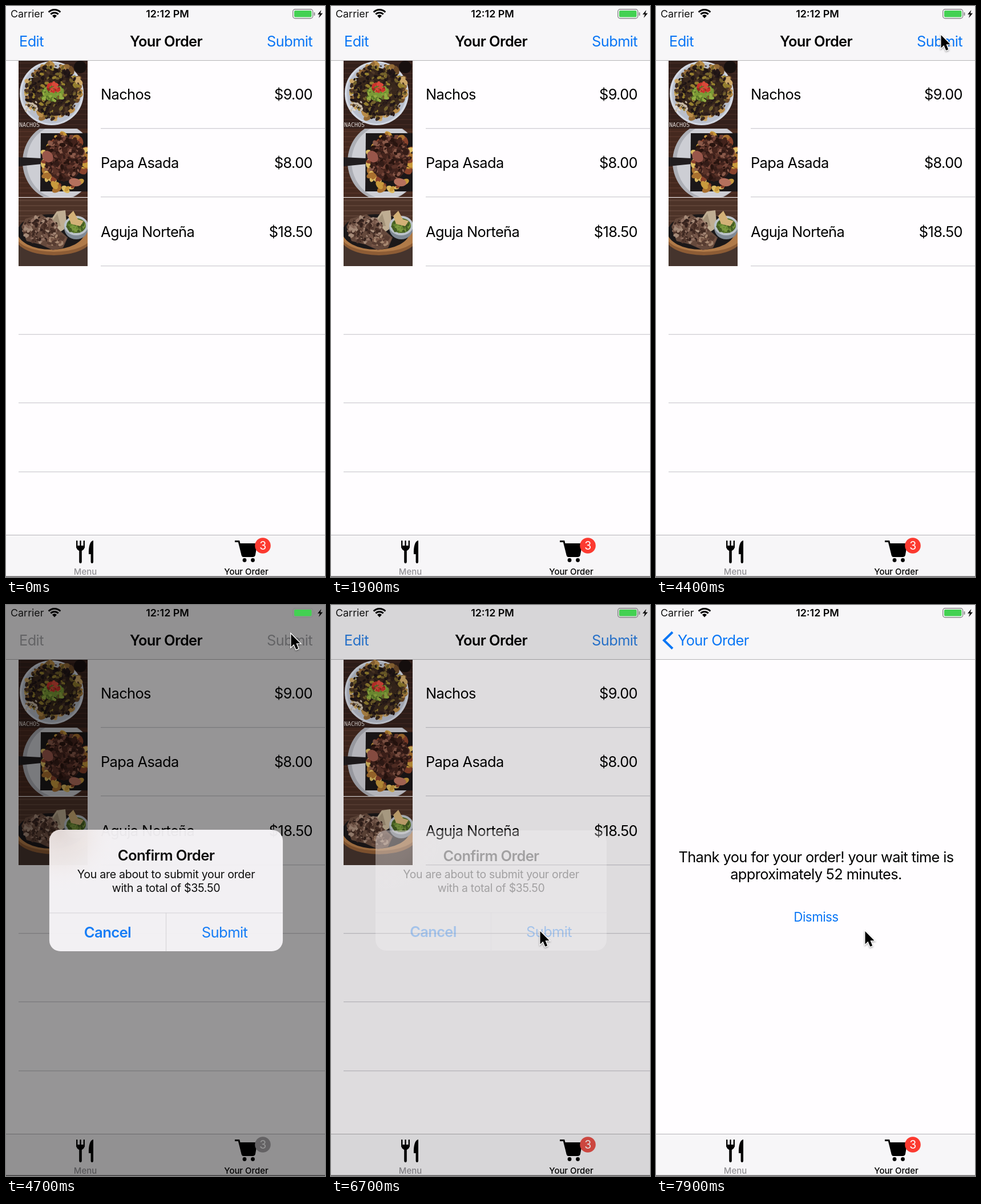
Animation, 559 px wide and 1001 px high, one loop 8 s. Source, as an HTML page with a canvas:

```html
<!DOCTYPE html>
<html lang="en">
<head>
<meta charset="utf-8">
<title>Your Order</title>
<style>
html, body { margin: 0; width: 100%; height: 100%; overflow: hidden; background: #fffdff; }
canvas { display: block; }
</style>
</head>
<body>
<canvas id="stage" width="559" height="1001"></canvas>
<script>
const W = 559, H = 1001, LOOP = 8000;
const TINT = [10, 118, 245], RED = [252, 58, 48], GRAY = [168, 167, 170];
const BLUE = `rgb(${TINT})`;
const BAR = '#f7f6f8', PAGE = '#fffdff', LINE = '#cfced3', EDGE = '#b5b4b7';
const stage = document.getElementById('stage').getContext('2d');
let c = stage;

const clamp = v => Math.min(1, Math.max(0, v));
const span = (t, a, b) => clamp((t - a) / (b - a));
const smooth = v => v * v * (3 - 2 * v);
const easeOut = v => 1 - (1 - v) ** 3;
const lerp = (a, b, v) => a + (b - a) * v;
const mix = (a, b, v) => `rgb(${a.map((n, i) => Math.round(lerp(n, b[i], v)))})`;

function rect(x, y, w, h, color) {
  c.fillStyle = color;
  c.fillRect(x, y, w, h);
}
function oval(x, y, rx, ry, color, turn = 0) {
  c.fillStyle = color;
  c.beginPath();
  c.ellipse(x, y, rx, ry, turn, 0, 7);
  c.fill();
}
function round(x, y, w, h, r, color) {
  c.fillStyle = color;
  c.beginPath();
  c.roundRect(x, y, w, h, r);
  c.fill();
}
function shape(d, color) {
  c.fillStyle = color;
  c.fill(new Path2D(d));
}
function line(d, color, width) {
  c.strokeStyle = color;
  c.lineWidth = width;
  c.stroke(new Path2D(d));
}
function text(str, x, y, size, color = '#000', align = 'left', weight = 400) {
  c.font = `${weight} ${size}px Inter, Roboto, sans-serif`;
  c.letterSpacing = (size > 22 ? -0.024 : size > 18 ? -0.015 : 0) * size + 'px';
  c.textAlign = align;
  c.fillStyle = color;
  c.fillText(str, x, y);
}
function faded(alpha, draw) {
  c.save();
  c.globalAlpha *= alpha;
  draw();
  c.restore();
}

// Food pictures, painted once
function picture(paint) {
  const cv = document.createElement('canvas');
  cv.width = 121;
  cv.height = 120;
  c = cv.getContext('2d');
  let seed = 7;
  const rnd = () => (seed = seed * 16807 % 2147483647) / 2147483647;
  const crumbs = (n, x, y, rx, ry, colors, size, inner = 0) => {
    for (let i = 0; i < n; i++) {
      const a = rnd() * 6.283, d = Math.sqrt(lerp(inner, 1, rnd())), s = size * (0.5 + rnd());
      oval(x + Math.cos(a) * d * rx, y + Math.sin(a) * d * ry, s, s * 0.6,
        colors[Math.floor(rnd() * colors.length)], rnd() * 3);
    }
  };
  paint(crumbs);
  c = stage;
  return cv;
}
function wood(base, grain) {
  rect(0, 0, 121, 120, base);
  for (let y = 4; y < 120; y += 9) rect(0, y, 121, 2, grain);
}

const nachos = picture(crumbs => {
  wood('#33201b', '#402721');
  oval(58, 58, 56, 56, '#d3d8e2');
  oval(58, 58, 52, 53, '#b9bfcc');
  crumbs(80, 61, 55, 49, 49, ['#b98c48', '#cda868', '#936a36', '#6d4a28'], 5.5, 0.55);
  oval(60, 56, 43, 42, '#38271b');
  crumbs(330, 60, 56, 48, 47, ['#1d1414', '#2c1d19', '#241819', '#3b2a20', '#74622c', '#96802f', '#4e3828'], 3.2);
  crumbs(14, 22, 82, 11, 15, ['#dcd6d0', '#c9bba8'], 2.5);
  crumbs(70, 59, 59, 20, 13, ['#7a9a36', '#93ad42', '#5a7829'], 3.6);
  crumbs(20, 61, 48, 12, 9, ['#c8332b', '#d9493a', '#96271f'], 3.5);
  oval(108, 12, 11, 11, '#17100f');
  c.font = '10px "DejaVu Sans Mono", monospace';
  c.fillStyle = '#d8d2cf';
  c.fillText('NACHOS', 1, 117);
});

const papa = picture(crumbs => {
  wood('#45291f', '#523126');
  oval(70, 58, 63, 68, '#adafb6');
  oval(74, 58, 60, 65, '#cdced4');
  shape('M39 8H121V110H38Z', '#1b1718');
  shape('M0 50L40 52V62L0 66Z', '#211d1f');
  crumbs(75, 82, 60, 40, 50, ['#c99a3d', '#dcbb62', '#a9702f', '#8a422b'], 6, 0.5);
  oval(80, 53, 33, 39, '#41241e');
  crumbs(230, 80, 51, 35, 39, ['#28140f', '#43231c', '#5a3228', '#754538', '#341c17', '#8a5a4a'], 4.2);
  oval(51, 49, 11, 9, '#98564a', 0.9);
  oval(99, 94, 11, 7, '#b5705d', 0.2);
});

const aguja = picture(crumbs => {
  wood('#4d3328', '#5e4236');
  rect(0, 84, 121, 36, '#45342d');
  oval(62, 69, 68, 32, '#8d5c35');
  oval(62, 67, 66, 28, '#b07a48');
  oval(57, 60, 59, 31, '#1b1819');
  shape('M50 48L67 24L82 22L85 52L70 62Z', '#bfae93');
  shape('M54 48L68 28L74 50Z', '#a39279');
  shape('M5 51L12 37L40 29L53 38L64 50L86 70L78 88L60 92L38 82L14 76Z', '#65493c');
  crumbs(170, 38, 56, 31, 22, ['#412a22', '#765749', '#8d6d5e', '#52382e', '#a58a78', '#33211c'], 3.2);
  crumbs(36, 66, 77, 15, 11, ['#573c31', '#a5866f', '#765445'], 3.6);
  oval(101, 53, 21, 20, '#7f8994');
  oval(101, 49, 21, 17, '#bcc3ca');
  oval(101, 49, 17, 13, '#4f6b28');
  crumbs(50, 101, 51, 15, 10, ['#668630', '#7c9a40', '#445d22'], 3);
  shape('M87 32L96 23L104 38L114 41L108 50L92 46Z', '#d3b177');
});

const ROWS = [
  [nachos, 'Nachos', '$9.00'],
  [papa, 'Papa Asada', '$8.00'],
  [aguja, 'Aguja Norteña', '$18.50']
];

function orderList() {
  rect(0, 96, W, 832, PAGE);
  ROWS.forEach(([photo, name, price], i) => {
    const y = 95 + i * 120.3;
    c.drawImage(photo, 22, Math.round(y));
    text(name, 166, y + 69, 25.4);
    text(price, 537, y + 69, 25.4, '#000', 'right');
  });
  for (let i = 0; i < 6; i++) {
    const x = i < 3 ? 166 : 22;
    rect(x, Math.round(214 + i * 120.3), W - x, 1.3, LINE);
  }
}

function thanks() {
  rect(0, 96, W, 832, PAGE);
  text('Thank you for your order! your wait time is', 280.5, 451, 25.4, '#000', 'center');
  text('approximately 52 minutes.', 280.5, 481, 25.4, '#000', 'center');
  text('Dismiss', 280.5, 555, 22.4, BLUE, 'center');
}

function navBar(push, tint) {
  rect(0, 0, W, 95, BAR);
  rect(0, 95, W, 1, EDGE);
  faded(clamp(1 - push * 1.3), () => {
    text('Edit', 23, 71, 25.4, tint);
    text('Submit', 537, 71, 25.4, tint, 'right');
    text('Your Order', lerp(280.5, 100, push), 71, 25.4, '#000', 'center', 600);
  });
  faded(push, () => {
    line('M29 47.500L14 62L29 76.500', BLUE, 4);
    text('Your Order', lerp(218, 38, push), 71, 25.4, BLUE);
  });
}

function tabBar(badge) {
  rect(0, 927, W, 74, BAR);
  rect(0, 927, W, 1, EDGE);
  // fork and knife
  for (const x of [123, 129.3, 135.6]) round(x, 937, 2.4, 13, 1, '#000');
  shape('M123 946H138C138 952 135 954 132.800 955V974Q132.800 977 130.500 977Q128.200 977 128.200 974V955C126 954 123 952 123 946Z', '#000');
  shape('M153 937V974Q153 977 150.800 977Q148.600 977 148.600 974V961H145C144.500 948 147 938 153 937Z', '#000');
  // cart
  line('M401 938.500H408L414.500 964', '#000', 3);
  shape('M408.500 942H440.500L437 962Q436.500 965.500 433 966H415.500Q413.500 966 413 963Z', '#000');
  oval(418, 971.5, 3.4, 3.4, '#000');
  oval(432.5, 971.5, 3.4, 3.4, '#000');
  oval(450, 946, 13.8, 13.8, badge);
  text('3', 450, 953, 19.4, '#fff', 'center');
  text('Menu', 139, 997, 14.9, '#929195', 'center', 500);
  text('Your Order', 421, 997, 14.9, '#000', 'center', 500);
  rect(0, 999.5, W, 1.5, '#6a696b');
}

function statusBar() {
  text('Carrier', 8, 20, 17.9, '#111');
  text('12:12 PM', 283, 20, 17.9, '#050505', 'center', 600);
  for (const r of [14.5, 9.3]) {
    c.beginPath();
    c.arc(85, 21, r, -2.36, -0.78);
    c.strokeStyle = '#000';
    c.lineWidth = 3;
    c.stroke();
  }
  shape('M85 21.500L81 17Q85 13.500 89 17Z', '#000');
  c.strokeStyle = '#8b8a8c';
  c.lineWidth = 1.4;
  c.beginPath();
  c.roundRect(502.7, 5.7, 35, 16, 4);
  c.stroke();
  round(505, 8, 30.5, 11.5, 2, '#43d152');
  round(539.5, 11, 2, 6, 1, '#8b8a8c');
  shape('M552.500 7L546 14.800H550L548 21L555 12.800H550.800Z', '#000');
}

function alertBox(alpha, scale) {
  faded(alpha, () => {
    c.translate(280.5, 500.5);
    c.scale(scale, scale);
    c.translate(-280.5, -500.5);
    round(78, 395, 405, 211, 19, '#f7f5f8');
    const glow = c.createRadialGradient(95, 400, 0, 95, 400, 105);
    glow.addColorStop(0, 'rgba(220,208,204,.75)');
    glow.addColorStop(0.5, 'rgba(236,226,223,.5)');
    glow.addColorStop(1, 'rgba(247,245,248,0)');
    round(78, 395, 405, 211, 19, glow);
    rect(78, 539, 405, 1, '#d3d1d5');
    rect(280, 539, 1, 67, '#d3d1d5');
    text('Confirm Order', 280.5, 449, 25.4, '#000', 'center', 600);
    text('You are about to submit your order', 280.5, 479, 19.4, '#000', 'center');
    text('with a total of $35.50', 280.5, 503, 19.4, '#000', 'center');
    text('Cancel', 179, 582, 25.4, BLUE, 'center', 600);
    text('Submit', 382, 582, 25.4, BLUE, 'center');
  });
}

// Pointer moves: start, end, x, y
const MOVES = [[2600, 2700, 441, 963], [3500, 4200, 499, 50], [5500, 6100, 366, 571]];
function pointer(t) {
  if (t < 2600) return;
  let x = 446, y = 1003;
  for (const [a, b, px, py] of MOVES) {
    const v = smooth(span(t, a, b));
    x = lerp(x, px, v);
    y = lerp(y, py, v);
  }
  c.save();
  c.translate(x, y);
  c.shadowColor = 'rgba(0,0,0,.35)';
  c.shadowBlur = 3;
  c.shadowOffsetY = 1.5;
  const d = 'M0.500 1V23.500L5.500 18.800L9.300 27.800L13.200 26.200L9.500 17.300H16.500Z';
  line(d, '#fff', 2.6);
  c.shadowColor = 'transparent';
  shape(d, '#000');
  c.restore();
}

function draw(t) {
  const shown = easeOut(span(t, 4500, 4820));
  const dim = shown * (1 - smooth(span(t, 6500, 6815)));
  const push = easeOut(span(t, 7050, 7550));

  if (push < 1) {
    c.save();
    c.translate(-W * 0.3 * push, 0);
    orderList();
    c.restore();
    rect(0, 96, W, 832, `rgba(0,0,0,${0.1 * push})`);
  }
  if (push > 0) {
    c.save();
    c.translate(W * (1 - push), 0);
    thanks();
    c.restore();
  }
  const dull = smooth(dim);
  navBar(push, mix(TINT, GRAY, dull));
  tabBar(mix(RED, GRAY, dull));
  rect(0, 0, W, H, `rgba(0,0,0,${0.435 * dim})`);
  statusBar();
  if (dim > 0) alertBox(dim, lerp(1.2, 1, shown));
  pointer(t);
}

function tick() {
  draw(performance.now() % LOOP);
  requestAnimationFrame(tick);
}
tick();
</script>
</body>
</html>
```
